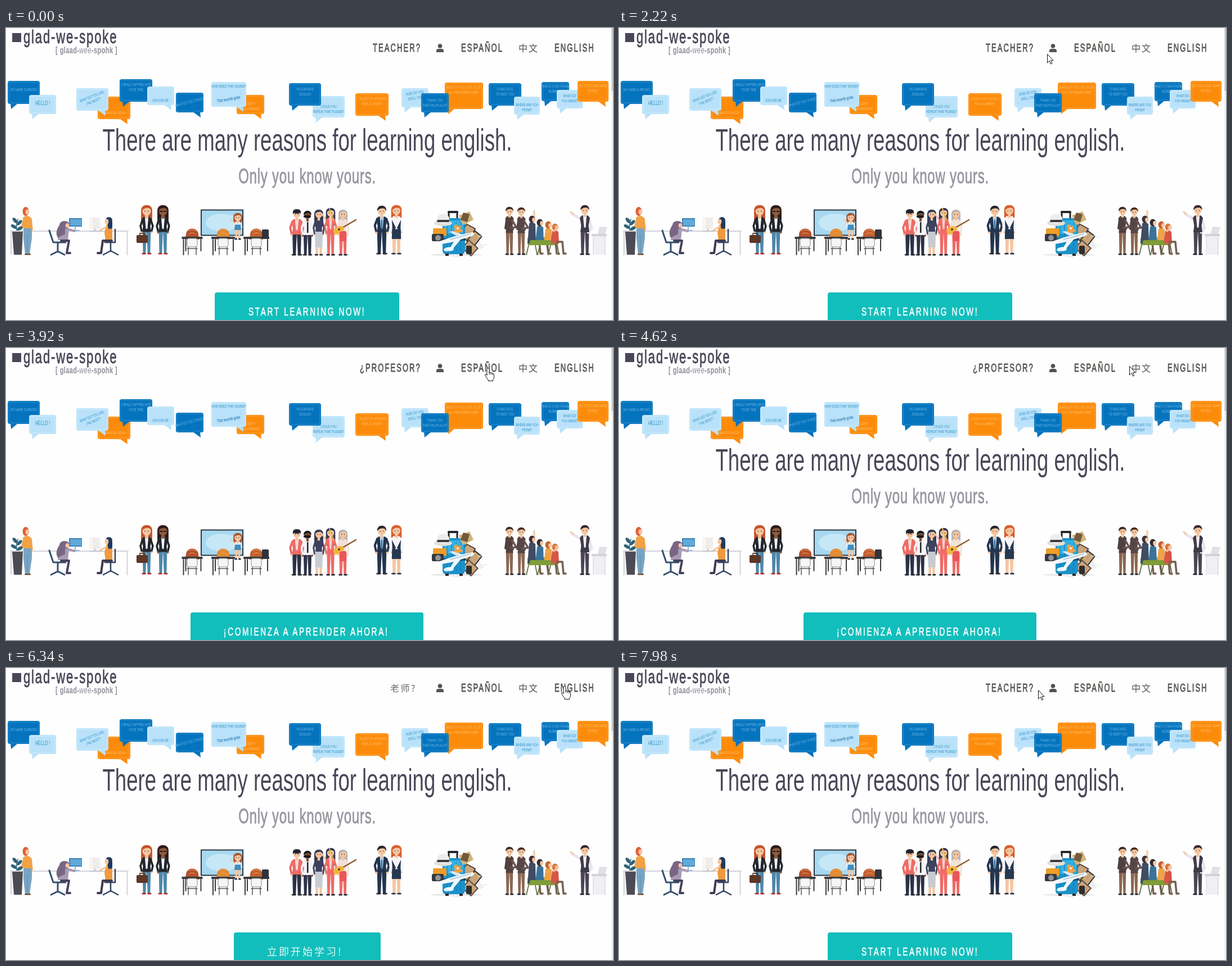
An HTML page that plays this animation: 1079 px wide and 519 px high, repeating every 8000 ms.

```html
<!DOCTYPE html>
<html lang="en">
<head>
<meta charset="utf-8">
<title>Learning English</title>
<style>
html, body { margin: 0; width: 100%; height: 100%; overflow: hidden; background: #fefefe; }
svg { display: block; }
text { font-family: "Liberation Sans", "Noto Sans CJK SC", sans-serif; white-space: pre; }
.cjk { font-family: "Noto Sans CJK SC Light", "Noto Sans CJK SC", "Noto Sans CJK", sans-serif; font-weight: 300; }
</style>
</head>
<body>
<svg id="stage" width="1079" height="519" viewBox="0 0 1079 519"></svg>
<script>
const LOOP = 8000, STEP = 76.7;
const NARROW = 0.65; // one condensing factor for the display face
const INK = '#4a4658', NAV = '#57524e', TEAL = '#12bebb';

// Drawing helpers
const rect = (x, y, w, h, f, r = 0) => `<rect x="${x}" y="${y}" width="${w}" height="${h}" rx="${r}" fill="${f}"/>`;
const dot = (x, y, r, f, ry = r) => `<ellipse cx="${x}" cy="${y}" rx="${r}" ry="${ry}" fill="${f}"/>`;
const fill = (d, f) => `<path d="${d}" fill="${f}"/>`;
const line = (d, s, w = 1.5) => `<path d="${d}" fill="none" stroke="${s}" stroke-width="${w}" stroke-linecap="round" stroke-linejoin="round"/>`;
const text = (x, y, s, size, f, { ls = 0, anchor = 'start', rot = 0, weight = 0 } = {}) =>
  `<text transform="translate(${x} ${y}) rotate(${rot}) scale(${NARROW} 1)" font-size="${size}" letter-spacing="${ls}" text-anchor="${anchor}" fill="${f}" stroke="${f}" stroke-width="${weight}">${s}</text>`;
const cjk = (x, y, s, size, f, ls) =>
  `<text class="cjk" x="${x}" y="${y}" font-size="${size}" letter-spacing="${ls}" fill="${f}">${s}</text>`;
const nav = (x, s) => text(x, 42, s, 20, NAV, { ls: 3.2, weight: 0.8 });
const label = (x, s) => text(x, 511, s, 21, '#fff', { ls: 4.1, weight: 0.6 });

// Speech bubbles: x, y, w, h, colour, tail side, lines, first baseline, rotation
const TONES = {
  b: ['#0574be', '#6db5e6', '#3f95d0'],
  l: ['#b9e2fa', '#2d90c4', '#d6eefc'],
  o: ['#fd8b0a', '#ffc070', '#ffab4c']
};
const BUBBLES = [
  [3, 94, 57, 41, 'b', 'L', 'MY NAME IS BRUNO', 112],
  [41, 119, 48, 34, 'l', 'L', 'HELLO !', 137],
  [163, 122, 58, 40, 'o', 'R', 'THANKS SO MUCH', 153],
  [125, 107, 57, 40, 'l', 'R', 'WHAT DO YOU LIKE|THE MOST?', 124, -22],
  [202, 91, 58, 40, 'b', 'L', 'I REALLY APPRECIATE|YOUR TIME', 103],
  [251, 104, 48, 33, 'l', 'R', 'EXCUSE ME', 131],
  [302, 115, 49, 35, 'b', 'R', 'WHAT DO YOU THINK?', 134, -14],
  [410, 119, 49, 34, 'o', 'R', 'I DON\'T|UNDERSTAND', 137],
  [365, 96, 62, 44, 'l', 'R', 'HOW DOES THAT SOUND?', 106],
  [545, 121, 57, 38, 'l', 'L', 'COULD YOU|REPEAT THAT PLEASE?', 142],
  [503, 98, 57, 40, 'b', 'L', 'I\'M LEARNING|ENGLISH', 111],
  [621, 116, 59, 40, 'o', 'R', 'COULD YOU PLEASE|TALK SLOWER?', 128],
  [703, 107, 48, 34, 'l', 'L', 'HOW DO YOU|SPELL THAT?', 118, -9],
  [780, 97, 68, 47, 'o', 'L', 'WHAT DO YOU LIKE TO DO|IN YOUR SPARE TIME?', 108],
  [738, 116, 49, 34, 'b', 'L', 'THANK YOU|THAT HELPS A LOT', 131],
  [858, 98, 58, 40, 'b', 'L', 'IT WAS NICE|TO MEET YOU', 111],
  [903, 122, 46, 32, 'l', 'L', 'WHERE ARE YOU|FROM?', 139],
  [952, 96, 49, 34, 'b', 'L', 'WHAT\'S YOUR PHONE|NUMBER?', 106],
  [979, 110, 46, 33, 'l', 'L', 'WHAT DO|YOU MEAN?', 123],
  [1016, 94, 55, 37, 'o', 'R', 'DO YOU COME HERE|OFTEN?', 105]
];
function bubble([x, y, w, h, tone, side, words, base, rot = 0]) {
  const [bg, fg, edge] = TONES[tone], b = y + h - 1;
  const tail = side === 'L'
    ? `M${x + 5} ${b}L${x + 6} ${b + 10}L${x + 18} ${b}Z`
    : `M${x + w - 19} ${b}L${x + w - 5} ${b + 10}L${x + w - 6} ${b}Z`;
  const size = words.length < 8 ? 10.5 : 7.4;
  return rect(x, y, w, h, bg, 4) + fill(tail, bg) +
    `<rect x="${x + 2}" y="${y + 2}" width="${w - 4}" height="${h - 4}" rx="3" fill="none" stroke="${edge}" stroke-width=".8"/>` +
    words.split('|').map((s, i) =>
      text(x + w / 2 + (rot ? i * 3 : 0), base + i * 8.5, s, size, fg, { anchor: 'middle', rot })).join('');
}

// Standing figure; proportions follow its height
function person(x, y, h, skin, hair, top, leg, { w = h * 0.2, head = 0.085, long = 0, skirt = '', shoe = '#2d2b33', shirt = '', pose = '' } = {}) {
  const R = h * head, s = y + R * 2.4 + h * 0.035, hip = y + h * 0.55, foot = y + h;
  const limb = k => fill(`M${x} ${hip - 4}H${x + k * w * 0.42}L${x + k * w * 0.36} ${foot - 1}H${x + k * w * 0.1}Z`, leg) +
    dot(x + k * w * 0.28, foot - 1, w * 0.22, shoe, 1.6);
  const arm = k => line(`M${x + k * w * 0.4} ${s + 2}L${x + k * w * 0.62} ${s + h * 0.16}L${x + k * w * 0.48} ${hip}`, top, w * 0.2) +
    dot(x + k * w * 0.48, hip + 1, w * 0.11, skin);
  return (long ? rect(x - R * 1.15, y + 1, R * 2.3, h * long, hair, R) : '') +
    limb(-1) + limb(1) +
    (pose || arm(-1) + arm(1)) +
    fill(`M${x - w * 0.3} ${s - 2}H${x + w * 0.3}L${x + w * 0.5} ${s + 2}L${x + w * 0.37} ${s + h * 0.17}L${x + w * 0.43} ${hip}H${x - w * 0.43}L${x - w * 0.37} ${s + h * 0.17}L${x - w * 0.5} ${s + 2}Z`, top) +
    (shirt ? fill(`M${x - w * 0.18} ${s - 2}h${w * 0.36}l${-w * 0.1} ${h * 0.24}h${-w * 0.16}Z`, shirt) : '') +
    (skirt ? fill(`M${x - w * 0.43} ${hip - 5}h${w * 0.86}l.5 ${h * 0.2}h${-w * 0.86 - 1}Z`, skirt) : '') +
    rect(x - R * 0.3, y + R * 1.7, R * 0.6, R * 1.2, skin) +
    dot(x, y + R * 1.25, R * 0.88, skin, R) +
    fill(`M${x - R} ${y + R * 1.3}C${x - R * 1.2} ${y - R * 0.3} ${x + R * 1.2} ${y - R * 0.3} ${x + R} ${y + R * 1.3}Q${x + R * 0.7} ${y + R * 0.6} ${x + R * 0.1} ${y + R * 0.7}Q${x - R * 0.6} ${y + R * 0.7} ${x - R} ${y + R * 1.3}Z`, hair) +
    dot(x - R * 0.35, y + R * 1.35, 0.8, '#333') + dot(x + R * 0.35, y + R * 1.35, 0.8, '#333');
}

const SKIN = '#f5c5a0', NAVY = '#263852', CORAL = '#ef6a66', DARK = '#2b2a32';

function office() {
  const leaf = (x, y, a) => `<ellipse cx="${x}" cy="${y}" rx="6" ry="3" fill="#2f6277" transform="rotate(${a} ${x} ${y})"/>`;
  return line('M20 363Q17 352 21 340', '#2f6277') +
    leaf(16, 342, 50) + leaf(24, 346, -45) + leaf(14, 353, 30) + leaf(25, 356, -30) +
    line('M8 361H217M9 361V403M215.5 361V403', '#d3d3da', 2) +
    fill('M11 362H30L28 403H14Z', '#4c4c54') +
    fill('M31 353Q38 346 46 353L46 373L42 402H34L31 375Z', '#78a5c4') + line('M38 368V400', '#5c8bad', 1) +
    fill('M30 337Q38 330 45 338L46 356H31Z', '#f0a346') + line('M32 340L29 352L41 350M44 339L46 358', '#f0a346', 3.5) +
    dot(35, 326, 5.5, '#e25f35', 8) + dot(38, 327, 3.4, SKIN, 4.5) +
    rect(33, 401, 11, 2.5, '#7a4a35', 1) +
    rect(112, 338, 23, 15, '#3c84bb') + rect(114, 340, 20, 11, '#62aad8') + line('M123 353V360M117 360H130', '#8fb4d0', 2) +
    line('M77 360L84 381H106M92 381V398M80 403L92 397L104 403', '#34506f', 3) +
    fill('M92 377L95 357Q103 350 112 356L110 377Z', '#a89ab4') + line('M108 357L122 361', '#a89ab4', 4) +
    dot(104, 350, 9, '#7a6585', 7) + fill('M96 349Q86 362 92 373L105 366V350Z', '#7a6585') + dot(109, 351, 3.4, SKIN, 4) +
    line('M98 378H112L108 400H114', '#46415b', 4) +
    rect(149, 337, 18, 20, '#f0ecea') + rect(150, 338, 4, 18, '#fbf6ef') + line('M158 357V361M150 361H170', '#bcc2ca', 2) +
    fill('M175 364L178 350Q184 345 189 351V378H177Z', '#ef9a3d') + line('M179 353L167 360', SKIN, 3) +
    dot(183, 342, 6, '#1f3a60') + rect(181, 342, 8, 15, '#1f3a60', 4) + dot(179, 344, 3.4, SKIN, 4.5) +
    line('M188 378H172L169 400H163', '#3e3b52', 4) +
    line('M194 358V381H176M186 381V397M173 403L186 396L199 403', '#30435f', 2.5);
}

function pair() {
  const look = { head: 0.098, long: 0.38, shirt: '#f6f6f6', shoe: '#b5302c' };
  return person(250, 314, 88, SKIN, '#c4542e', '#23262d', '#4c86a8', look) +
    rect(232, 368, 20, 14, '#5e3727', 2) + line('M238 368V365H246V368', '#3f241b') +
    person(279, 314, 88, '#8b5a3e', '#2b1d19', '#23262d', '#4c86a8', look) +
    line('M273 326H277.5M280.5 326H285', '#2b1d19', 2);
}

function classroom() {
  const desk = (x, w, hair) =>
    dot(x, 367, 11, hair, 10.5) + line(`M${x - 9} 369l-2 5M${x + 9} 369l2 5`, hair, 4) +
    line(`M${x - 7} 361q7 -5 14 0M${x - 6} 366q6 -4 12 0`, '#f0a055', 1) +
    rect(x - w / 2, 371, w, 4, '#3a3b40', 1) +
    line(`M${x - w / 2 + 3} 376V403M${x + w / 2 - 3} 376V396M${x - w / 2 + 7} 376V396`, '#3a3b40', 2) +
    `<rect x="${x - 9}" y="374" width="18" height="15" rx="3" fill="#f6f6f6" stroke="#8c8c92"/>` +
    line(`M${x - 7} 390V403M${x + 7} 390V403M${x - 9} 392H${x + 9}`, '#55565b');
  return rect(346, 322.5, 76, 47, '#2d3740') + rect(348, 324.5, 72, 43, '#a7d8ef') +
    dot(384, 346, 29, '#c6e7f6', 16) +
    person(412, 328, 48, SKIN, '#a5542d', '#dff0f8', SKIN, { head: 0.14, long: 0.4, w: 12, skirt: '#3f8cc0' }) +
    line('M407 347L400 341', SKIN, 2) +
    desk(331, 37, '#b5502c') + desk(386, 42, '#e08a35') + desk(445, 46, '#c25f30') + rect(455, 358, 12, 16, '#31333a', 2);
}

function band() {
  const guitar = line('M591 359L622 341', '#8b5b2e', 2.5) + dot(594, 357, 7, '#f2b63f', 5) + dot(588, 361, 6, '#f2b63f', 6) + dot(592, 358, 2, '#5c3920');
  return person(517, 322, 82, SKIN, '#24222b', CORAL, '#2c3146', { w: 19, shirt: '#f9d9d3' }) + dot(517, 326, 7, '#24222b', 4) +
    person(536, 324, 80, '#7a4d38', '#17171c', '#f2f2f4', '#2c3146', { w: 17 }) +
    rect(529, 333, 13, 4, '#17171c', 2) + rect(535, 345, 2.5, 19, '#20222c') +
    person(556, 322, 82, SKIN, '#343b58', '#3c425e', SKIN, { w: 15, long: 0.4, skirt: '#c7ccd3' }) + rect(549.5, 372, 13, 18, '#c7ccd3', 1) +
    line('M568 339L562 331', SKIN, 3) +
    person(577, 319, 85, SKIN, '#333854', CORAL, CORAL, { w: 16, long: 0.4, shirt: '#fbd0c5' }) + line('M583 342L575 321', '#f0b53f', 2) +
    person(599, 322, 82, SKIN, '#b9b5b4', '#f3e0d8', CORAL, { w: 16, long: 0.33 }) +
    rect(593, 361, 12, 18, '#e9565b', 2) + guitar;
}

function colleagues() {
  return person(668, 315, 87, SKIN, '#24272e', '#24344e', '#24344e', { head: 0.092, shirt: '#a9d3ee', w: 20 }) + rect(667, 341, 2, 17, '#2567a0') +
    person(694, 314, 88, SKIN, '#d6602f', '#f4f4f5', SKIN, { head: 0.092, long: 0.33, w: 18, skirt: NAVY, shoe: NAVY }) +
    fill('M686 341L693 355L687 364ZM702 341L695 355L701 364Z', NAVY);
}

function luggage() {
  const card = (x, y, w, h, a, f) => `<g transform="translate(${x} ${y}) rotate(${a})">${rect(0, 0, w, h, f, 1)}${rect(2, 2, w - 4, h - 4, '#c8a57a')}</g>`;
  return dot(800, 403, 46, '#e7e7ea', 2) + fill('M788 405L840 378L850 390L805 408Z', '#eeeeef') +
    card(818, 347, 20, 27, 28, '#5b4436') + card(833, 359, 18, 25, 38, '#32302f') +
    card(823, 376, 23, 20, 42, '#584a42') +
    line('M787 340V327H802V340', '#25262b', 3) + rect(785, 325, 19, 4, '#25262b', 2) +
    rect(776, 338, 40, 64, '#1b92ca', 6) + rect(779, 342, 34, 24, '#37b1e3', 4) +
    line('M784 346V396M792 346V396M800 346V396M808 346V396', '#127bb0', 1) +
    rect(775, 374, 42, 4, '#174c6b') + rect(781, 401, 6, 4, DARK) + rect(806, 401, 6, 4, DARK) +
    fill('M805 333L824 326L831 341L812 350Z', '#d7b27b') + fill('M813 328L824 331L820 345L808 341Z', '#71593f') +
    rect(759, 356, 24, 14, '#ee9d2b', 2) + rect(757, 366, 21, 13, '#35393e', 2) + dot(768, 373, 5, '#8d949a') +
    dot(777, 347, 16, '#e2e0de', 5) + dot(777, 339, 11, '#efedea', 9) + rect(766, 341, 22, 4, '#3b3a3c', 2) +
    fill('M800 348l3 5 6-2-1 6 5 4-6 2-2 5-4-5-6 0 3-5-2-5Z', '#f2a041') + dot(803, 356, 2, '#fff0d3') +
    fill('M768 380Q800 368 830 363Q836 366 828 370L808 376L793 394L788 393L796 380L775 384Z', '#f5f8fb') +
    fill('M800 369L788 362L793 361L812 367Z', '#dfe9f0') + line('M790 376L826 366', '#62afd4', 1) +
    dot(788, 393, 8, '#fff', 3.5) + dot(783, 394, 5, '#e5f3fb', 3) + rect(818, 387, 10, 15, '#2f2e31', 2) +
    line('M838 371q6-3 10 0t9-1M847 386q6-3 10 0', '#dceef0', 1);
}

function lecture() {
  const chair = x => rect(x, 372, 16, 14, '#7f9d38', 3) + line(`M${x + 2} 386L${x - 2} 403M${x + 14} 386L${x + 17} 403`, '#4b5a2c');
  const seat = (x, y, hair, top) => fill(`M${x - 5} ${y + 7}Q${x} ${y + 4} ${x + 6} ${y + 8}L${x + 7} 383H${x - 8}Z`, top) +
    line(`M${x + 3} 380H${x + 13}L${x + 15} 401H${x + 19}`, '#75604e', 3.5) +
    dot(x, y, 5.5, hair, 6.5) + dot(x + 3, y + 1, 2.8, SKIN, 4);
  const listener = (x, y, hair, coat) => person(x, y, 403 - y, SKIN, hair, coat, '#8a6650', {
    w: 15, head: 0.08, pose: line(`M${x - 5} ${y + 24}L${x - 7} ${y + 39}L${x + 6} ${y + 40}`, coat, 4)
  }) + line(`M${x + 5} ${y + 25}L${x + 12} ${y + 37}L${x + 2} ${y + 38}`, '#6a5551', 3.5);
  return listener(895, 317, '#3d2a24', '#50403e') + listener(916, 318, '#4a2d22', '#564647') +
    chair(927) + chair(947) + chair(966) +
    line('M939 342V325', SKIN, 3) + seat(935, 340, '#40303a', '#3e4c64') + seat(949, 346, '#352d31', '#39739b') +
    seat(964, 350, '#c85f30', '#f0a248') + seat(976, 354, '#dc7740', '#d55546') + line('M974 361L982 354', SKIN, 3) +
    rect(931, 377, 38, 9, '#7f9d38', 3) +
    person(1029, 314, 89, SKIN, '#33272a', '#3e3a48', '#4a4453', {
      w: 18, shirt: '#f1eef2',
      pose: line('M1022 340L1008 331', '#e8e5ec', 5) + line('M1008 331L1004 327', SKIN, 3) + line('M1036 340L1041 355L1035 363', '#e8e5ec', 5)
    }) +
    rect(1041, 366, 27, 4, '#d2d2d8') + fill('M1044 370H1065V403H1046Z', '#f0f0f4') + line('M1044 370V403M1065 370V403', '#d8d8df') +
    fill('M1052 366L1055 353L1069 354L1065 366Z', '#e0e1e7');
}

const LANGS = {
  en: [371, 328, nav(652, 'TEACHER?'), label(431, 'START LEARNING NOW!')],
  es: [328, 414, nav(629, '¿PROFESOR?'), label(387, '¡COMIENZA A APRENDER AHORA!')],
  zh: [405, 261, cjk(683, 42, '老师?', 16, '#6a6d68', 2.4), cjk(464, 511, '立即开始学习!', 18, '#e4f8f7', 3)]
};
const page = ([x, w, teacher, words], id) =>
  `<g id="${id}">${teacher}${rect(x, 470, w, 60, TEAL, 4)}${words}</g>`;

const logo = rect(11, 9, 16, 16, INK) +
  text(31, 27, 'glad-we-spoke', 34, INK, { ls: 2.8, weight: 0.8 }) +
  text(198, 45, '<tspan font-weight="bold">[ glaad-</tspan><tspan font-style="italic">wee</tspan><tspan font-weight="bold">-spohk ]</tspan>', 17, '#8f8d99', { ls: 0.6, anchor: 'end' });

const stage = document.getElementById('stage');
stage.innerHTML =
  rect(1076, 0, 3, 519, '#f1f1f1') + rect(1076.5, 0, 2.5, 112, '#c6c6c8') +
  logo +
  dot(771.5, 32, 3.8, NAV) + fill('M765 43V40.5Q765 37 769 37H774Q778 37 778 40.5V43Z', NAV) +
  nav(809, 'ESPAÑOL') + cjk(911, 42, '中文', 16, NAV, 2) + nav(975, 'ENGLISH') +
  BUBBLES.map(bubble).join('') +
  text(396, 129, 'That sounds great', 8, '#0b64a8', { anchor: 'middle', rot: -10 }) +
  '<g id="title">' +
  text(535.5, 218, 'There are many reasons for learning english.', 56.3, INK, { anchor: 'middle' }) +
  text(535.5, 276, 'Only you know yours.', 37, '#97969f', { anchor: 'middle', ls: 1.15, weight: 0.8 }) + '</g>' +
  office() + pair() + classroom() + band() + colleagues() + luggage() + lecture() +
  Object.keys(LANGS).map(k => page(LANGS[k], k)).join('') +
  `<g id="mouse"><circle id="ring" r="11" fill="#ffff00" fill-opacity=".47"/>
   <g fill="#fff" stroke="#111" stroke-linejoin="round">
   <path id="arrow" d="M.5 .5v15.500l3.600-3.400 2.500 5.400 2.300-1-2.400-5.300h4.500z"/>
   <g id="hand"><path d="M-2 1.500a2 2 0 0 1 4 0v6q3-1 3 1q3-1 3 1q2.500-.500 2.500 2v5q0 2-2 4v2h-8.500v-2l-5-7q-1-3 1-3q2 0 2 2z"/>
   <path d="M2 7v4M5 8.500v3M8 9.500v2.500" fill="none"/></g></g></g>`;

// Pointer path: time, x, y
const PATH = [
  [610, 987, 498], [1000, 850, 250], [1230, 745, 80], [1380, 722, 36],
  [1610, 680, 12], [1760, 650, 6], [1910, 664, 44], [2070, 720, 52], [2220, 761, 46],
  [2450, 700, 18], [2610, 655, 12], [2760, 650, 40], [2910, 690, 46], [3070, 724, 38],
  [3145, 724, 38], [3450, 857, 36], [4243, 857, 36], [4500, 895, 30], [4700, 925, 36],
  [5883, 925, 36], [6150, 955, 31], [6340, 993, 33], [6820, 993, 33], [7210, 777, 18],
  [7290, 735, 11], [7400, 690, 16], [7590, 640, 26], [7670, 632, 36], [7820, 670, 45], [7980, 745, 39]
];
const LINKS = [[652, 738], [764, 779], [807, 884], [909, 946], [973, 1047]];
const HIDDEN = [[3920, 4320], [5180, 5640], [6820, 7280]];
const CLICKS = [[3620, 3710], [4870, 4940], [6510, 6580]];
const within = (spans, v) => spans.some(([a, b]) => v >= a && v < b);

function pointer(t) {
  const i = PATH.findIndex(k => k[0] > t);
  if (i < 0) return PATH[PATH.length - 1].slice(1);
  const [a, ax, ay] = PATH[i - 1], [b, bx, by] = PATH[i];
  const k = Math.min(1, Math.floor((t - a + 6) / STEP) * STEP / (b - a));
  return [Math.round(ax + (bx - ax) * k), Math.round(ay + (by - ay) * k)];
}

const $ = id => document.getElementById(id);
const show = (id, on) => $(id).setAttribute('visibility', on ? 'visible' : 'hidden');

function draw() {
  const t = performance.now() % LOOP;
  const lang = t < 3920 || t >= 6820 ? 'en' : t < 5180 ? 'es' : 'zh';
  for (const k in LANGS) show(k, k === lang);
  show('title', !within(HIDDEN, t));
  const on = t >= 610;
  const [x, y] = on ? pointer(t) : [0, 0];
  const link = y >= 26 && y <= 45 && within(LINKS, x);
  $('mouse').setAttribute('transform', `translate(${x} ${y})`);
  show('arrow', on && !link);
  show('hand', on && link);
  show('ring', within(CLICKS, t));
  requestAnimationFrame(draw);
}
draw();
</script>
</body>
</html>
```
